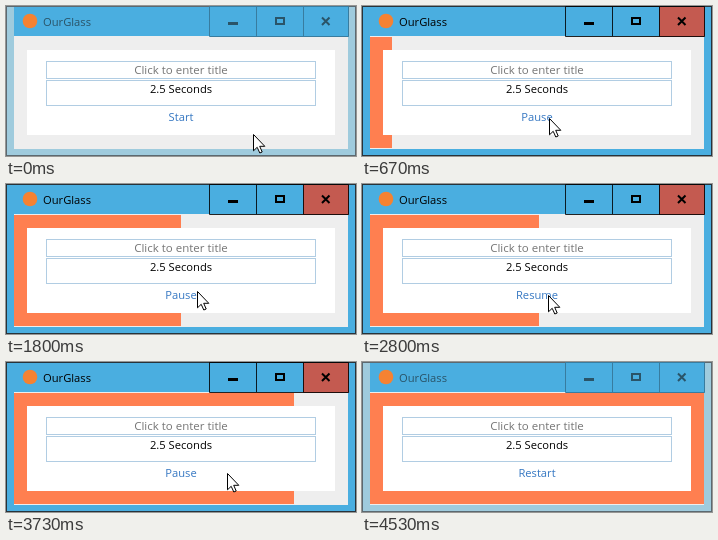
An HTML page that plays this animation: 350x150 px, repeating every 4590 ms.

```html
<!DOCTYPE html>
<html lang="en">
<head>
<meta charset="utf-8">
<title>OurGlass</title>
<style>
  html, body { margin: 0; width: 100%; height: 100%; overflow: hidden; }
  svg { display: block; width: 350px; height: 150px; }
  text { font: 11.2px "Open Sans", "Noto Sans", sans-serif; }
  .mid { text-anchor: middle; }
  .win { --frame: #4aaee0; --edge: #28333a; --line: rgb(0 0 0 / .85); --ink: #000; --close: #c45a50; }
  .win.idle { --frame: #9fcbdd; --edge: #5c6970; --line: #387c9f; --ink: #2a5468; --close: #4aaee0; }
  .frame { fill: var(--frame); stroke: var(--edge); }
  .line { fill: none; stroke: var(--line); }
  .ink { fill: var(--ink); }
  .mark { fill: none; stroke: var(--ink); stroke-width: 2; }
  .box { fill: #fff; stroke: #b1cde3; }
</style>
</head>
<body>
<svg viewBox="0 0 350 150">
  <g id="win" class="win">
    <rect class="frame" x=".5" y=".5" width="349" height="149"/>
    <rect x="8" y="1" width="334" height="30" fill="#4aaee0"/>
    <rect x="8" y="30" width="334" height="113" fill="#eee"/>
    <circle cx="24" cy="15" r="7.3" fill="#f58232"/>
    <text class="ink" x="37" y="20">OurGlass</text>
    <rect x="297" y="1" width="46" height="30" style="fill:var(--close)"/>
    <path class="line" d="M203.5 .5H342.5V30.5H203.5ZM250.5 1V30M297.5 1V30"/>
    <rect class="ink" x="222" y="16" width="10" height="3"/>
    <path class="mark" d="M270 12H278V18H270Z"/>
    <path class="mark" d="M316 11.5L323.5 19M323.5 11.5L316 19"/>
  </g>
  <rect id="bar" x="8" y="31" height="111" fill="#ff7f50"/>
  <rect x="21" y="44" width="308" height="85" fill="#fff"/>
  <rect class="box" x="40.5" y="55.5" width="269" height="17"/>
  <rect class="box" x="40.5" y="74.5" width="269" height="25"/>
  <text class="mid" x="175" y="68" fill="#757575" style="font-size:11.5px">Click to enter title</text>
  <text class="mid" x="175" y="87">2.5 Seconds</text>
  <text id="link" class="mid" x="175" y="115" fill="#3577c2"></text>
  <path id="cursor" d="M.5 .5V16.8L4.2 13.3 6.8 19 9.2 18 6.7 12.3H11.8Z" fill="#fff" stroke="#000"/>
</svg>
<script>
const LOOP = 4590, SPEED = 0.128, FULL = 334;
const START = 498, PAUSE = 1820, RESUME = 2862;
const FOCUS = 460, BLUR = 4530;
const MOVE = 300; // duration of each pointer move

// Pointer moves: arrival time and where the tip stops.
const home = { x: 247, y: 128 };
const moves = [
  { at: 390, x: 186, y: 112 },
  { at: 940, x: 221, y: 110 },
  { at: 1800, x: 191, y: 107 },
  { at: 2130, x: 218, y: 110 },
  { at: 2800, x: 186, y: 111 },
  { at: 3180, x: 221, y: 111 },
  { at: 4070, x: 162, y: 113 },
  { at: 4430, x: 214, y: 152 },
];

const $ = id => document.getElementById(id);
const win = $('win'), bar = $('bar'), link = $('link'), cursor = $('cursor');
const clamp = (v, lo, hi) => Math.min(hi, Math.max(lo, v));

function ease(u) {
  u = clamp(u, 0, 1);
  return u * u * (3 - 2 * u);
}

function pointer(t) {
  return moves.reduce((p, m) => {
    const u = ease((t - m.at) / MOVE + 1);
    return { x: p.x + (m.x - p.x) * u, y: p.y + (m.y - p.y) * u };
  }, home);
}

function progress(t) {
  const ran = clamp(t, START, PAUSE) - START + Math.max(0, t - RESUME);
  return Math.min(FULL, Math.round(ran * SPEED));
}

function label(t, done) {
  if (t < START) return 'Start';
  if (done) return 'Restart';
  return t >= PAUSE && t < RESUME ? 'Resume' : 'Pause';
}

function draw(now) {
  const step = Math.floor((now % LOOP + 4) * 3 / 200);
  const t = Math.round(step * 20 / 3) * 10;
  const width = progress(t);
  const { x, y } = pointer(t);
  win.classList.toggle('idle', t < FOCUS || t >= BLUR);
  bar.setAttribute('width', width);
  link.textContent = label(t, width === FULL);
  cursor.setAttribute('transform', `translate(${Math.round(x)} ${Math.round(y)})`);
}

const begin = performance.now();
function loop() {
  draw(performance.now() - begin);
  requestAnimationFrame(loop);
}
loop();
</script>
</body>
</html>
```
